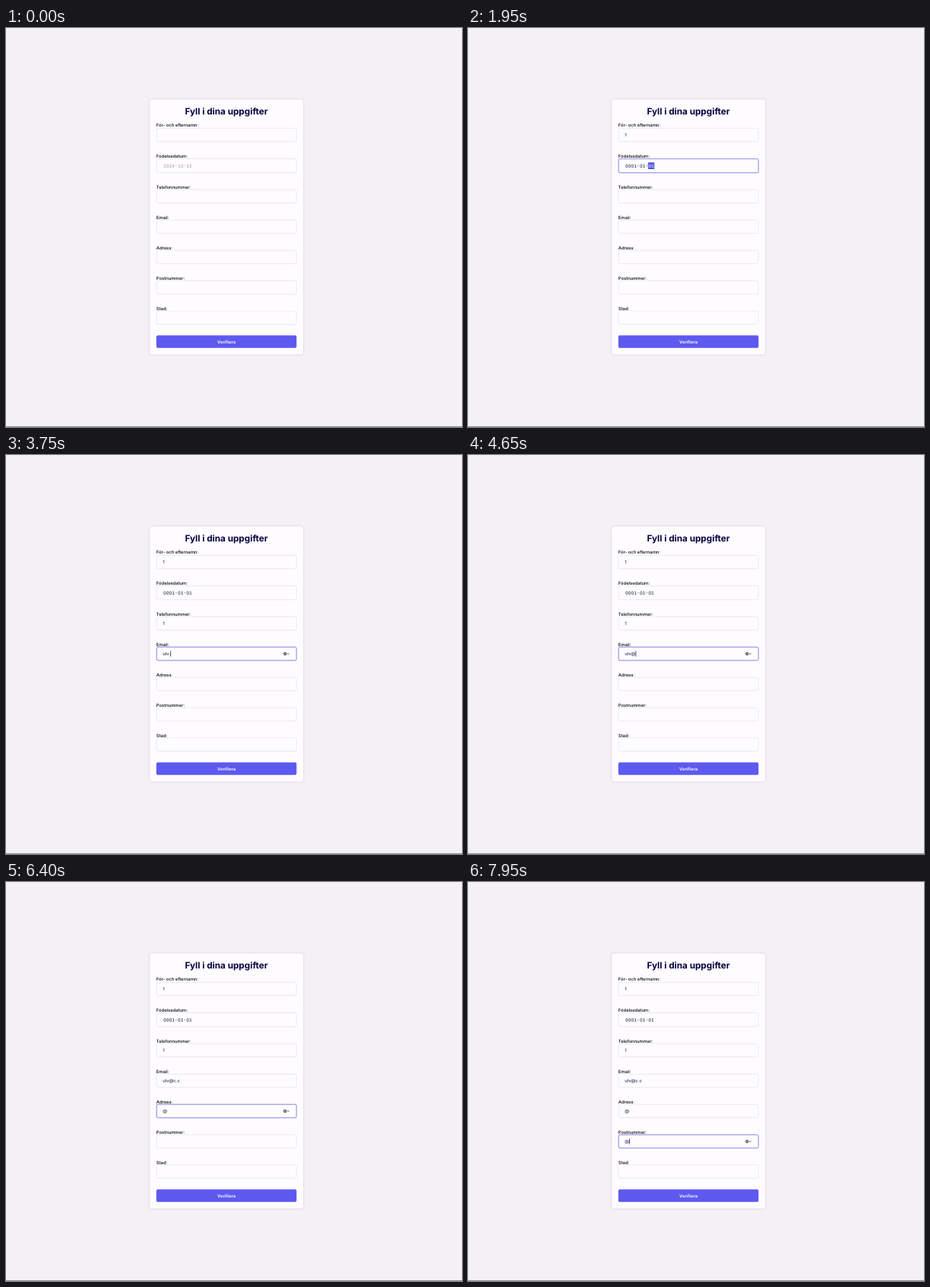
These frames come from a looping animation (600 by 526 pixels, 8 s). An HTML page:

```html
<!DOCTYPE html>
<html lang="sv">
<head>
<meta charset="utf-8">
<title>Formulär</title>
<style>
html, body { margin: 0; width: 100%; height: 100%; overflow: hidden; background: #f3f1f4; }
svg { display: block; width: 100%; height: 100%; }
text { font: 500 5.84px Inter, sans-serif; text-rendering: geometricPrecision; white-space: pre; }
.title { font-size: 11.76px; font-weight: 700; fill: #07033f; }
.label { fill: #050508; }
.value { fill: #35324f; }
.date { font-variant-numeric: tabular-nums; }
.button { font-weight: 600; fill: #fff; }
.card { fill: #fefcff; filter: drop-shadow(0 .7px 1.6px rgba(40, 35, 70, .17)); }
.box { fill: #fefcff; stroke: #e0e4e9; stroke-width: .7; }
.box.focus { stroke: #7672dc; stroke-width: .8; filter: drop-shadow(0 .3px .4px rgba(90, 84, 200, .25)); }
</style>
</head>
<body>
<svg id="stage" viewBox="0 0 600 526">
  <rect width="600" height="526" fill="#f3f1f4"/>
  <rect y="525" width="600" height="1" fill="#8d8c90"/>
  <rect class="card" x="189.3" y="94.3" width="201.8" height="336.2" rx="3.6"/>
  <text class="title" x="290" y="114.3" text-anchor="middle">Fyll i dina uppgifter</text>
  <g id="fields"></g>
  <rect x="197.8" y="405.3" width="184.5" height="16.4" rx="1.8" fill="#5e59ef"/>
  <text class="button" x="290.1" y="415.7" text-anchor="middle">Verifiera</text>
  <g id="autofill" fill="none" stroke="#111" stroke-width=".7">
    <circle cx="367.2" cy="0" r="1.8"/>
    <circle cx="367.2" cy="-.5" r=".6" fill="#111" stroke="none"/>
    <path d="M366 1.3q1.2-1.4 2.4 0M370.2-.5l1.2 1.1 1.2-1.1"/>
  </g>
  <rect id="caret" width=".9" height="7.4" fill="#3b378f"/>
  <path id="pointer" d="M0 0V7L1.6 5.6 2.8 8.2 4 7.7 2.8 5.2H4.9Z" fill="#000" stroke="#fff" stroke-width=".5"/>
</svg>
<script>
const LOOP = 8000, STEP = 50, BLINK = 500, TEXT_X = 206.2;
const NAME = 0, DATE = 1, PHONE = 2, EMAIL = 3, ADDRESS = 4, ZIP = 5;

// label, vertical centre of the label, vertical centre of the box
const rows = [
  ['För- och efternamn:', 128.1, 141],
  ['Födelsedatum:', 168.4, 181.6],
  ['Telefonnummer:', 209.4, 222],
  ['Email:', 249.5, 262],
  ['Adress:', 289.3, 302],
  ['Postnummer:', 329.3, 342],
  ['Stad:', 369.2, 381.8]
];

// time, focused field, its value, selected date part
const steps = [
  [700, NAME, ''], [1150, NAME, '1'],
  [1400, DATE, '2024-10-22', 0], [1550, DATE, '0001-10-22', 0],
  [1650, DATE, '0001-10-22', 1], [1750, DATE, '0001-01-22', 1],
  [1850, DATE, '0001-01-22', 2], [1950, DATE, '0001-01-01', 2],
  [2250, PHONE, ''], [2500, PHONE, '1'],
  [2850, EMAIL, ''], [3300, EMAIL, 'u'], [3450, EMAIL, 'ul'], [3600, EMAIL, 'ulv'],
  [3750, EMAIL, 'ulv.'], [4200, EMAIL, 'ulv'], [4600, EMAIL, 'ulv@'],
  [4950, EMAIL, 'ulv@c'], [5200, EMAIL, 'ulv@c.'], [5400, EMAIL, 'ulv@c.c'],
  [5650, ADDRESS, ''], [5850, ADDRESS, '@'],
  [6600, ZIP, ''], [7500, ZIP, '@']
];

const byId = id => document.getElementById(id);
const [caret, pointer, autofill] = ['caret', 'pointer', 'autofill'].map(byId);

function add(parent, tag, attributes, content = '') {
  const node = document.createElementNS('http://www.w3.org/2000/svg', tag);
  for (const key in attributes) node.setAttribute(key, attributes[key]);
  node.textContent = content;
  return parent.appendChild(node);
}
const show = (node, visible) => { node.style.display = visible ? '' : 'none'; };

const fields = rows.map(([label, labelY, y], index) => {
  const group = byId('fields');
  const isDate = index === DATE;
  const height = isDate ? 18.4 : 17.6;
  add(group, 'text', { class: 'label', x: 197.8, y: labelY + 2.3 }, label);
  const box = add(group, 'rect', { class: 'box', x: 198.2, y: y - height / 2, width: 183.9, height, rx: 1.8 });
  const mark = add(group, 'rect', { y: y - 4.4, height: 8.8, rx: .6, fill: '#4d55dc' });
  const text = add(group, 'text', { class: isDate ? 'value date' : 'value', x: TEXT_X, y: y + 2.2 });
  show(mark, false);
  return { y, box, mark, text };
});

// The selection mark reaches slightly past the digits it covers.
function drawDate({ text, mark, y }, value, selected, empty) {
  const margin = .4;
  text.textContent = '';
  text.style.fill = empty ? '#aaa8b2' : '';
  const spans = value.split('-').map((part, i) => {
    if (i) add(text, 'tspan', {}, '-');
    return add(text, 'tspan', { dx: i ? 0 : .8 }, part);
  });
  show(mark, selected !== undefined);
  if (selected === undefined) return;
  const span = spans[selected];
  const left = span.getStartPositionOfChar(0).x;
  const right = span.getEndPositionOfChar(span.textContent.length - 1).x;
  span.style.fill = '#fff';
  mark.setAttribute('x', left - margin);
  mark.setAttribute('width', right - left + 2 * margin);
}

function drawPointer(time) {
  show(pointer, time >= 50 && time < 1150);
  const p = Math.min(Math.max((time - 50) / 600, 0), 1);
  const ease = p * p * (3 - 2 * p);
  pointer.setAttribute('transform', `translate(${17 + 215 * ease} ${41 + 99 * ease})`);
}

function draw(time) {
  const done = steps.filter(step => step[0] <= time);
  const [since, focus, , selected] = done[done.length - 1] || [0, -1];
  const values = rows.map(() => '');
  done.forEach(([, field, value]) => { values[field] = value; });

  fields.forEach((field, index) => {
    field.box.classList.toggle('focus', index === focus);
    if (index === DATE) {
      drawDate(field, values[DATE] || '2024-10-22', focus === DATE ? selected : undefined, time < 1550);
    } else {
      field.text.textContent = values[index];
    }
  });

  const typing = focus >= 0 && focus !== DATE;
  show(autofill, typing && focus !== PHONE);
  show(caret, typing && (time - since) % (2 * BLINK) < BLINK);
  if (typing) {
    const { y, text } = fields[focus];
    autofill.setAttribute('transform', `translate(0 ${y})`);
    caret.setAttribute('x', TEXT_X + .1 + (values[focus] ? text.getComputedTextLength() : 0));
    caret.setAttribute('y', y - 3.7);
  }
  drawPointer(time);
}

const start = performance.now();
let shown = -1;
function tick() {
  const time = Math.floor((performance.now() - start) % LOOP / STEP) * STEP;
  if (time !== shown) draw(shown = time);
  requestAnimationFrame(tick);
}
tick();
</script>
</body>
</html>
```
